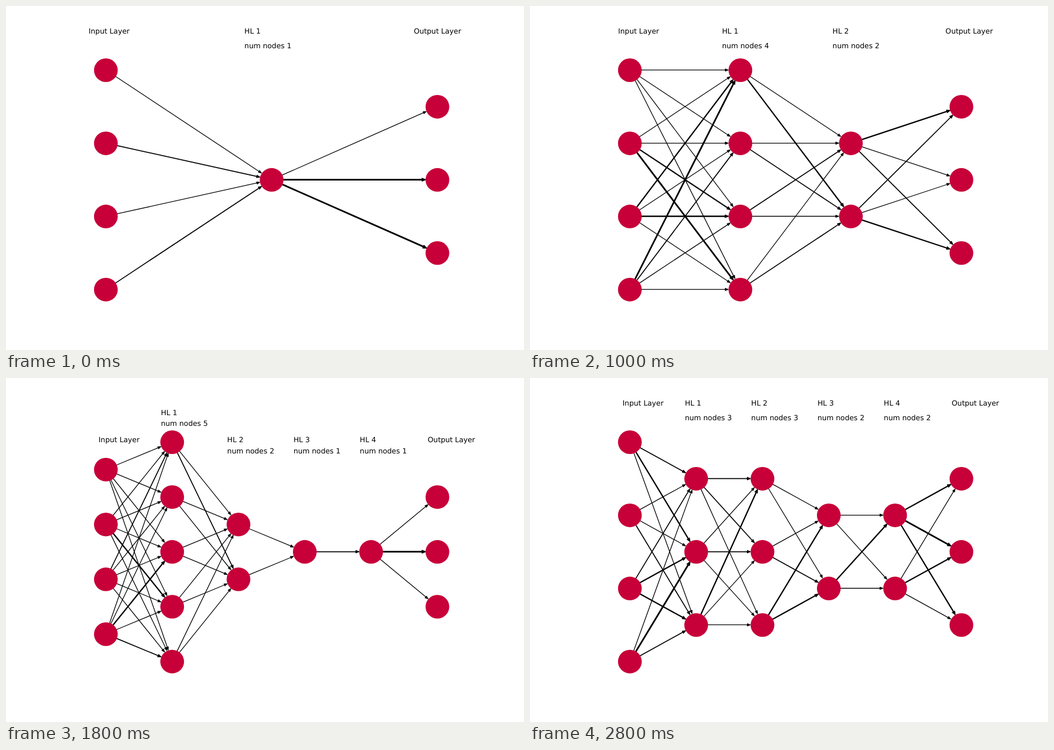
Write an HTML page that moves like this. It is 917x611 px and loops after 3000 ms.

```html
<!DOCTYPE html>
<html lang="en">
<head>
<meta charset="utf-8">
<title>Growing network</title>
<style>
  html, body { margin: 0; width: 100%; height: 100%; overflow: hidden; background: #fff; }
  svg { display: block; width: 917px; height: 611px; }
  g { visibility: hidden; }
  g.on { visibility: visible; }
  circle { fill: #c70039; }
  text { font: 12.74px "DejaVu Sans", sans-serif; text-rendering: geometricPrecision; }
  path { stroke: #000; stroke-linejoin: miter; }
</style>
</head>
<body>
<svg id="stage" viewBox="0 0 917 611"></svg>
<script>
const STEP = 200, INPUTS = 4, OUTPUTS = 3;
const LEFT = 176.8, RIGHT = 763.7, TOP = 114, BOTTOM = 503.7, RADIUS = 21;
const THIN = 1.3, WEIGHTS = { light: 1.7, mid: 2.3, heavy: 2.9 };

// Edges are named by gap letter, then start node and end node, counted from 1.
const scenes = [
  { hidden: [1], light: 'a21 a41', heavy: 'b12 b13' },
  { hidden: [2], light: 'a41 b11', mid: 'a22 b22', heavy: 'b23' },
  { hidden: [3], light: 'a41 b13 b32', mid: 'a22 a23 a32 b33', heavy: 'b31' },
  { hidden: [3, 1], light: 'a41 b21', mid: 'a23 a32', heavy: 'c13' },
  { hidden: [4, 1], light: 'b41 c11', mid: 'a24 a31 b11', heavy: 'a41 c13' },
  { hidden: [4, 2], light: 'a42 b22 b31 b42 c13 c21', mid: 'a23 a31 a33 b12 c11 c23', heavy: 'a24 a41' },
  { hidden: [4, 2, 1], light: 'a31 b31 c21', mid: 'a23 a33 b12', heavy: 'a24 d13' },
  { hidden: [5, 2, 1], light: 'a11 a14 a31 a42 a45 b22 b31 c21', mid: 'a15 a23 a43 b32', heavy: 'a25 a33 d11 d13' },
  { hidden: [5, 2, 1, 1], light: 'a14 a42 a45 b22', mid: 'a15 a33 b32', heavy: 'a25 e13' },
  { hidden: [5, 2, 1, 1], light: 'a31 a45 b12 d11', mid: 'a24 a43', heavy: 'e12' },
  { hidden: [4, 2, 2, 2], light: 'a24 a31 a32 a34 a44 b11 b12 b42 e13', mid: 'a11 d11', heavy: 'e22' },
  { hidden: [4, 2, 2, 2], light: 'a24 a31 b11 b42 d22', mid: 'a43 d11', heavy: 'e13' },
  { hidden: [5, 2, 2, 2], light: 'a15 a41 a45 b21 b42 d11 d12 d22', mid: 'a11 a43 b41', heavy: 'e12 e13' },
  { hidden: [4, 3, 2, 2], light: 'a11 a34 b11 c22', mid: 'a43 b41 d21', heavy: 'e12' },
  { hidden: [3, 3, 2, 2], light: 'a11 a23 a31 a43 b11 b12 b22 c22',
    mid: 'a12 a32 a33 b31 c31 c32 d21 e11 e13 e22', heavy: 'a42 e12' }
];

const stage = document.getElementById('stage');

function add(parent, tag, attrs, content = '') {
  const node = document.createElementNS(stage.namespaceURI, tag);
  for (const key in attrs) node.setAttribute(key, attrs[key]);
  node.textContent = content;
  return parent.appendChild(node);
}

function edge(group, from, to, width) {
  const dx = to.x - from.x, dy = to.y - from.y, length = Math.hypot(dx, dy);
  const ux = dx / length, uy = dy / length;
  const point = (along, across) =>
    `${from.x + ux * along - uy * across} ${from.y - 0.3 + uy * along + ux * across}`;
  const tip = length - RADIUS, base = tip - 6;
  add(group, 'path', { d: `M${point(RADIUS - 1, 0)}L${point(base + 1, 0)}`, 'stroke-width': width });
  add(group, 'path', {
    d: `M${point(base, -2.3)}L${point(tip, 0)}L${point(base, 2.3)}Z`,
    'stroke-width': width * 0.6
  });
}

function build(scene) {
  const group = add(stage, 'g', {});
  const counts = [INPUTS, ...scene.hidden, OUTPUTS];
  const last = counts.length - 1;
  const gapX = (RIGHT - LEFT) / last;
  const gapY = (BOTTOM - TOP) / (Math.max(...counts) - 1);
  const topOf = count => (TOP + BOTTOM - gapY * (count - 1)) / 2;
  const layers = counts.map((count, i) => Array.from({ length: count }, (_, j) =>
    ({ x: LEFT + gapX * i, y: topOf(count) + gapY * j })));

  const widths = {};
  for (const level in WEIGHTS)
    for (const name of (scene[level] || '').split(' ')) widths[name] = WEIGHTS[level];

  layers.slice(0, -1).forEach((layer, i) => layer.forEach((from, j) =>
    layers[i + 1].forEach((to, k) =>
      edge(group, from, to, widths['abcde'[i] + (j + 1) + (k + 1)] || THIN))));

  layers.flat().forEach(({ x, y }) => add(group, 'circle', { cx: x, cy: y, r: RADIUS }));

  counts.forEach((count, i) => {
    const x = LEFT + gapX * i;
    const y = topOf(Math.max(count, INPUTS)) - gapY * 0.5 + 0.4;
    if (i === 0) add(group, 'text', { x: x - gapX * 0.1 - 1.2, y }, 'Input Layer');
    else if (i === last) add(group, 'text', { x: x - gapX * 0.14 - 0.7, y }, 'Output Layer');
    else {
      const left = x - gapX * 0.16 - 1.2;
      add(group, 'text', { x: left, y }, `HL ${i}`);
      add(group, 'text', { x: left, y: y + gapY * 0.2 }, `num nodes ${count}`);
    }
  });
  return group;
}

const groups = scenes.map(build);
const start = performance.now();

function show(now) {
  const current = Math.floor(Math.max(0, now - start) / STEP) % groups.length;
  groups.forEach((group, i) => group.classList.toggle('on', i === current));
  requestAnimationFrame(show);
}
show(start);
</script>
</body>
</html>
```
